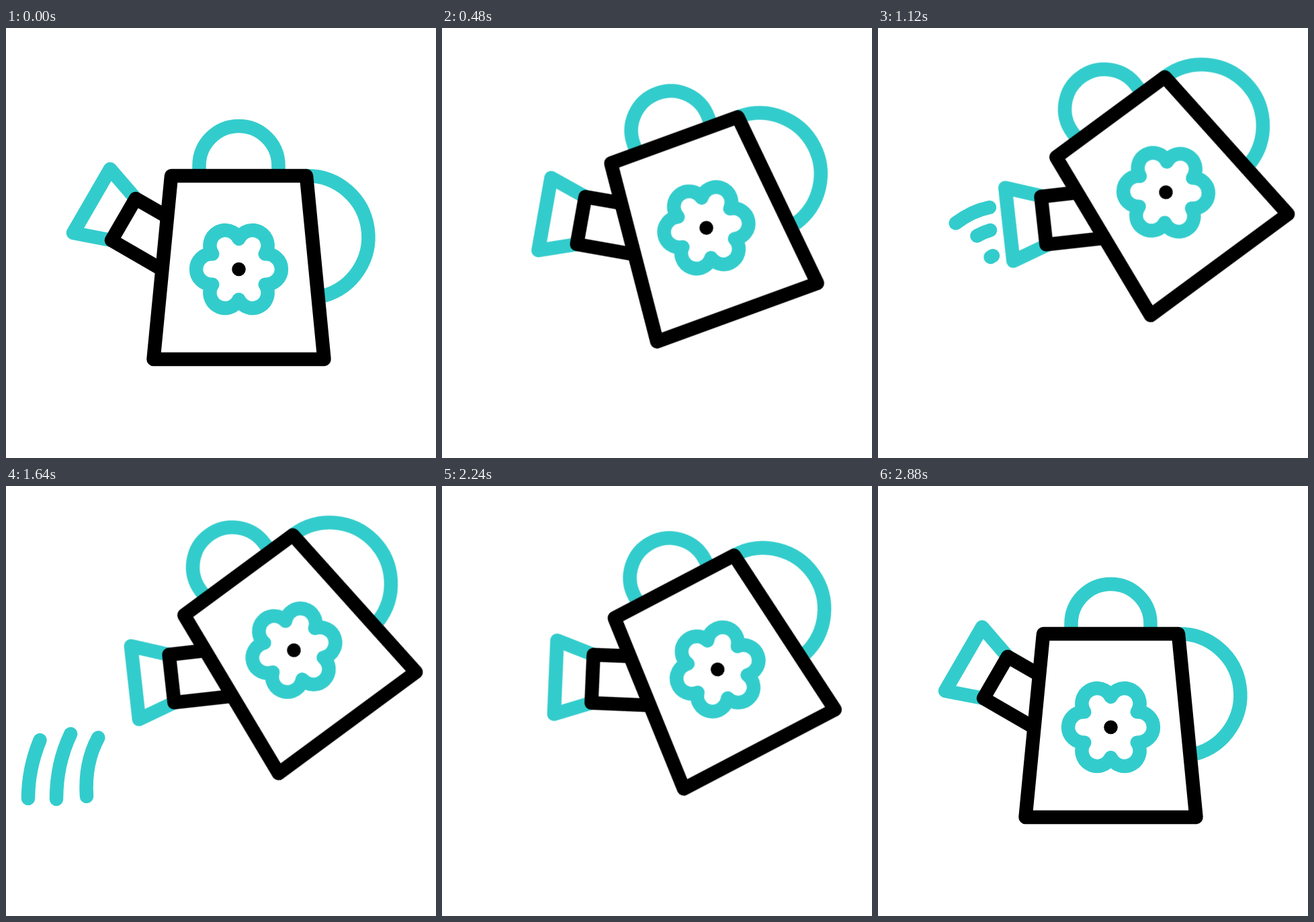
An HTML page for the animation above (3000 ms loop, 640x640 px).

```html
<!DOCTYPE html>
<html lang="en">
<head>
<meta charset="utf-8">
<title>Watering can</title>
<style>
  html, body { margin: 0; width: 100%; height: 100%; overflow: hidden; background: #fff; }
  svg {
    display: block; width: 100vw; height: 100vh;
    fill: none; stroke: #3cc; stroke-width: 20.5; stroke-linejoin: round;
  }
  .black { stroke: #000; }
  .can, .head, .flower, .drop { animation: 3s cubic-bezier(.333, 0, .667, 1) infinite backwards; }
  .can { animation-name: tilt; transform-origin: 320px 320px; }
  .head { animation-name: pump; }
  .flower { animation-name: spin; transform-origin: 346.5px 359px; }
  .drop {
    animation-name: pour; animation-delay: calc(var(--i) * 40ms);
    stroke-linecap: round; stroke-dasharray: 1 3;
  }

  @keyframes tilt {
    0% { transform: translate(0, 0) rotate(0deg); }
    6.667% { transform: translate(0, 0) rotate(0deg); animation-timing-function: cubic-bezier(.6, 0, .27, 1); }
    26.667% { transform: translate(64px, -91.2px) rotate(-36.4deg); }
    61.667% { transform: translate(64px, -91.2px) rotate(-36.4deg); animation-timing-function: cubic-bezier(.71, 0, .32, 1); }
    93.133%, 100% { transform: translate(0, 0) rotate(0deg); }
  }
  @keyframes pump {
    0%, 33.333%, 46.667%, 100% { transform: translate(0, 0); }
    40% { transform: translate(4.5px, 2.6px); }
  }
  @keyframes spin {
    0%, 6.667% { transform: rotate(0deg); }
    96%, 100% { transform: rotate(360deg); }
  }
  @keyframes pour {
    0%, 33.333% { stroke-dashoffset: 1; visibility: hidden; }
    33.334% { stroke-dashoffset: 1; visibility: visible; }
    46.667% { stroke-dashoffset: 0; visibility: visible; }
    59.999% { stroke-dashoffset: -1; visibility: visible; }
    60%, 100% { stroke-dashoffset: -1; visibility: hidden; }
  }
</style>
</head>
<body>
<svg viewBox="0 0 640 640">
  <path class="drop" style="--i:0" pathLength="1" d="M166 267C95 281 33 372 33 465"/>
  <path class="drop" style="--i:1" pathLength="1" d="M167 301C114 316 75 387 75 466"/>
  <path class="drop" style="--i:2" pathLength="1" d="M171 339C142 354 116 400 120 462"/>
  <g class="can">
    <path d="M287.5 220V205a59 59 0 0 1 118 0V220"/>
    <path d="M447 220H448.5A91 91 0 0 1 473 398.6"/>
    <path class="head" d="M193 254L155 210 100 305 157 316"/>
    <path class="black" d="M240 281L193 254 157 316 233 360"/>
    <path class="black" d="M246 220H447L473.5 493H219.5Z"/>
    <path class="flower" id="flower"/>
    <circle cx="346.5" cy="359" r="10.3" fill="#000" stroke="none"/>
  </g>
</svg>
<script>
  // Six petals: arcs between notches on a circle
  const notch = k => {
    const a = (k * 60 - 30) * Math.PI / 180;
    return `${346.5 + 45.3 * Math.cos(a)} ${359 + 45.3 * Math.sin(a)}`;
  };
  let d = `M${notch(0)}`;
  for (let k = 1; k <= 6; k++) d += `A22.7 22.7 0 1 1 ${notch(k)}`;
  document.getElementById('flower').setAttribute('d', d + 'Z');
</script>
</body>
</html>
```
